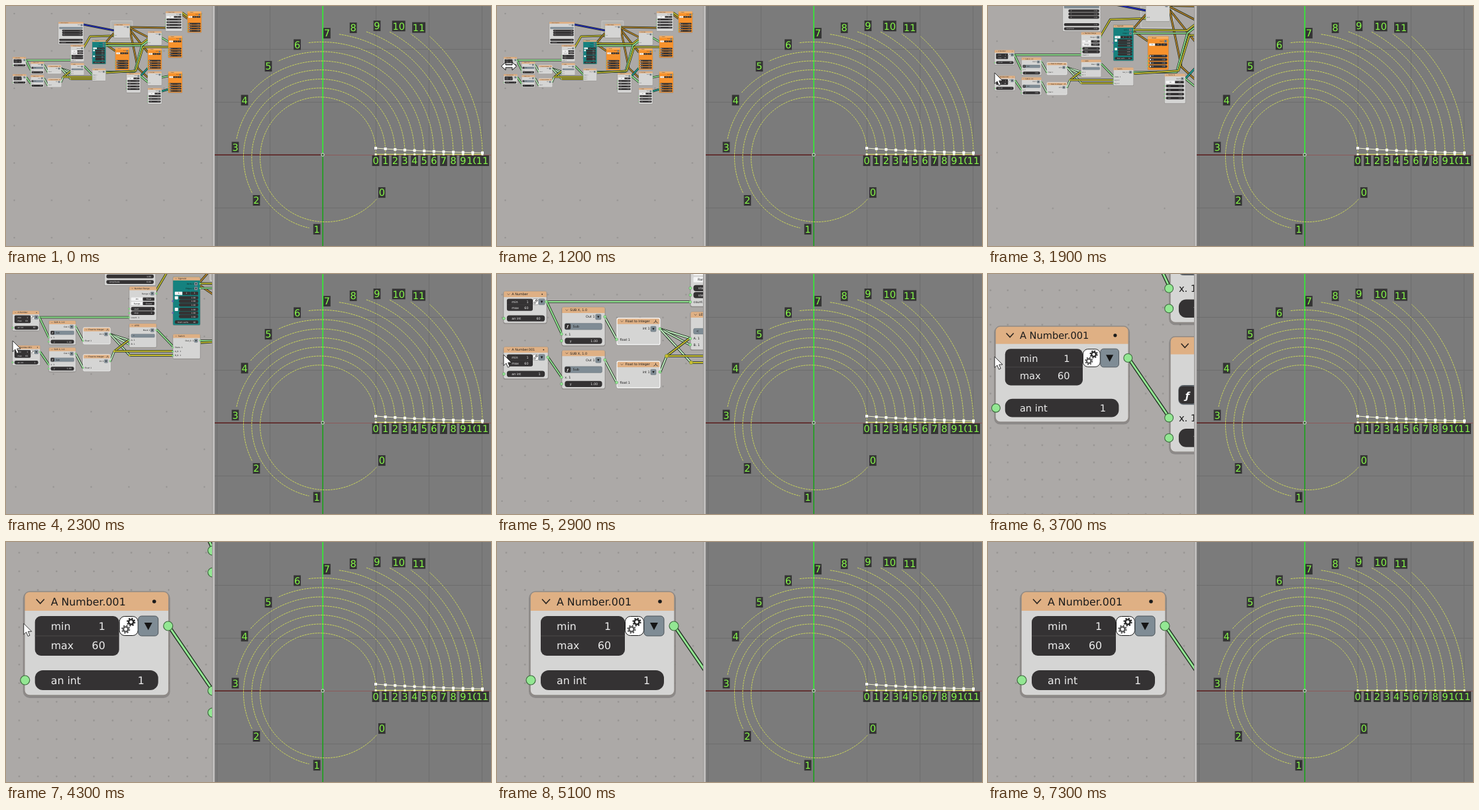
An HTML page that plays this animation: 732x363 px, repeating every 8 s.

```html
<!DOCTYPE html>
<html lang="en">
<head>
<meta charset="utf-8">
<title>Node graph and spiral curves</title>
<style>
html, body { margin: 0; width: 100%; height: 100%; overflow: hidden; background: #7b7b7b; }
svg { display: block; width: 732px; height: 363px; }
text { font-family: 'DejaVu Sans', sans-serif; font-size: 15.8px; text-rendering: geometricPrecision; }
.link { fill: none; vector-effect: non-scaling-stroke; stroke-linejoin: round; }
.edge { stroke: #1c2b1c; stroke-width: var(--edge); }
.core { stroke-width: var(--core); }
.curve { fill: none; stroke: #cbd65c; stroke-dasharray: 3 1; }
.tag { font-size: 14.5px; fill: #86f64a; text-anchor: middle; }
</style>
</head>
<body>
<svg id="stage" viewBox="0 0 732 363">
  <defs>
    <pattern id="dots" patternUnits="userSpaceOnUse"><circle r="1.1" fill="#8b8987"/></pattern>
    <clipPath id="pane"><rect width="311" height="363"/></clipPath>
  </defs>
  <rect width="312" height="363" fill="#aca9a7"/>
  <rect width="311" height="363" fill="url(#dots)"/>
  <g clip-path="url(#pane)"><g id="graph"></g></g>
  <rect x="311" width="4" height="363" fill="#bfbdbc"/>
  <rect x="311" width="1" height="363" fill="#9b9997"/>
  <g id="view"></g>
  <g id="arrow"><path d="M0 0V16.5L3.9 13L6.4 19.2L9.2 18L6.7 12H12Z" fill="#fff" stroke="#222" stroke-width=".9"/></g>
  <g id="sizer"><path d="M-11.5 0L-5 -6V-2H5V-6L11.5 0L5 6V2H-5V6Z" fill="#fff" stroke="#111"/></g>
</svg>
<script>
const $ = id => document.getElementById(id);
const graph = $('graph'), view = $('view');
const GREEN = '#93e793', DARK = '#343233', HEAD = '#dfb084', BODY = '#d5d5d4',
      STEEL = '#7f8c95', ORANGE = '#f7922c', YELLOW = '#c9bd2e', BROWN = '#b5802a', TEAL = '#15827f';

function add(parent, tag, attrs, str) {
  const e = document.createElementNS('http://www.w3.org/2000/svg', tag);
  for (const k in attrs) e.setAttribute(k, attrs[k]);
  if (str !== undefined) e.textContent = str;
  return parent.appendChild(e);
}
const box = (p, x, y, width, height, fill, rx = 0, more = {}) =>
  add(p, 'rect', { x, y, width, height, fill, rx, ...more });
const label = (p, x, y, str, fill = '#1b1b1b', anchor = 'start') =>
  add(p, 'text', { x, y, fill, 'text-anchor': anchor }, str);

// ---- right view: grid, axes, spirals ----
const CX = 478, CY = 225;
box(view, 315, 0, 417, 363, '#7b7b7b');
for (const x of [318, 398, 558, 638, 718]) box(view, x, 0, 1, 363, '#6d6d6d');
for (const y of [65, 145, 305]) box(view, 315, y, 417, 1, '#6d6d6d');
box(view, 315, 224.5, 163, 1.5, '#5a1c1c');
box(view, CX, 225, 254, 1, '#8c5a5a');
box(view, 477.3, 0, 1.7, 225, '#35ea35');
box(view, 477.3, 225, 1.7, 138, '#21a021');

const ends = [[106, 327.4], [113, 265.5], [121.5, 214.6], [132.5, 175], [144, 145], [157, 121.5],
              [171, 103], [184, 88], [197.5, 76.5], [211.5, 67.2], [226, 59.5], [241, 53]];
const startX = i => 558 + 14.64 * i;
const polar = (r, a) => [CX + r * Math.cos(a * Math.PI / 180), CY - r * Math.sin(a * Math.PI / 180)];

ends.forEach(([r1, turn], i) => {
  const r0 = startX(i) - CX, pts = [];
  for (let a = 0; a <= turn - 5; a += 1.5) pts.push(polar(r0 + (r1 - r0) * a / turn, a).map(v => v.toFixed(1)));
  add(view, 'polyline', { class: 'curve', points: pts.join(' ') });
});
add(view, 'circle', { cx: CX, cy: CY, r: 2.2, fill: '#2c5a2c', stroke: '#e8f4e8' });
box(view, 558, 223.8, 161, 1.2, '#d3e86a');
for (let i = 0; i < 12; i++) box(view, startX(i) - 1.5, 223, 3, 3, '#eef3d8');

const row = add(view, 'g', {});
const rowY = i => CY - 10 * Math.exp(-i / 9);
const rowPts = ends.map((_, i) => startX(i) + ',' + rowY(i));
add(row, 'polyline', { points: rowPts.join(' '), fill: 'none', stroke: '#eef0c8' });
ends.forEach((_, i) => box(row, startX(i) - 2, rowY(i) - 2, 4, 4, '#fff'));

function tag(x, y, n) {
  const w = 9.2 * String(n).length + 1.5;
  box(view, x - w / 2, y - 8, w, 16, '#343434');
  add(view, 'text', { class: 'tag', x, y: y + 5.3 }, n);
}
ends.forEach(([r, a], i) => tag(...polar(r, a), i));
ends.forEach((_, i) => tag(startX(i), 234, i));

// ---- node graph; one unit is one pixel at full zoom ----
const far = (x, y) => [(x - 10) * 10.48, (y - 103) * 10.48];
const near = (x, y) => [(x - 10) * 3.25, (y - 110) * 3.25];

function link(color, unit, ...xy) {
  const pts = [];
  for (let i = 0; i < xy.length; i += 2) pts.push(unit(xy[i], xy[i + 1]));
  add(graph, 'polyline', { class: 'link edge', points: pts.join(' ') });
  add(graph, 'polyline', { class: 'link core', points: pts.join(' '), stroke: color });
}
const socket = (p, cx, cy, fill = GREEN, r = 7) =>
  add(p, 'circle', { cx, cy, r, fill, stroke: '#3f6b3f', 'stroke-width': 1.2 });

function node(x, y, w, h, title, head = HEAD, body = BODY, selected = false) {
  const g = add(graph, 'g', { transform: `translate(${x} ${y})` });
  box(g, -2, 0, w + 4, h + 4, '#00000030', 10);
  box(g, 0, 0, w, h, body, 8);
  add(g, 'path', { d: `M0 29V8Q0 0 8 0H${w - 8}Q${w} 0 ${w} 8V29Z`, fill: head });
  box(g, 0, 0, w, h, 'none', 8, { stroke: selected ? '#fff' : '#8f8a86', 'stroke-width': selected ? 4 : 1.5 });
  add(g, 'path', { d: 'M18 11.5L24 18L30 11.5', fill: 'none', stroke: '#2a2420', 'stroke-width': 1.6 });
  label(g, 40, 20.5, title);
  return g;
}
function field(g, x, y, w, name, value, h = 30) {
  box(g, x, y, w, h, DARK, Math.min(12, h / 2));
  label(g, x + 24, y + h / 2 + 6, name, '#ececec');
  label(g, x + w - 21, y + h / 2 + 6, value, '#ececec', 'end');
}
function drop(g, x, y, s = 30) {
  box(g, x, y, s, s, STEEL, 5, { stroke: '#4b5359' });
  add(g, 'path', { d: `M${x + s * .3} ${y + s * .33}h${s * .4}l${-s * .2} ${s * .38}Z`, fill: '#151515' });
}
function gear(g, cx, cy, color) {
  add(g, 'circle', { cx, cy, r: 3.6, fill: 'none', stroke: color, 'stroke-width': 2.4 });
  add(g, 'circle', { cx, cy, r: 5.6, fill: 'none', stroke: color, 'stroke-width': 2, 'stroke-dasharray': '2.2 2.2' });
}
function output(g, w, y, name, fill) {
  label(g, w - 50, y + 5, name, '#1b1b1b', 'end');
  drop(g, w - 46, y - 13, 27);
  socket(g, w, y, fill);
}
function input(g, y, name) {
  socket(g, -2, y);
  label(g, 14, y + 5.5, name);
}
function segments(g, x, y, w, names) {
  const s = w / names.length;
  names.forEach((n, i) => {
    box(g, x + i * s, y, s - 2, 26, i ? DARK : '#f4f4f4', 5);
    label(g, x + (i + .5) * s, y + 18.5, n, i ? '#eee' : '#222', 'middle');
  });
}

function numberNode(y, w, title, value) {
  const g = node(0, y, w, 157, title);
  add(g, 'circle', { cx: w - 22, cy: 15, r: 2.8, fill: '#1b1b1b' });
  box(g, 16, 37, 127, 60, DARK, 9);
  box(g, 16, 66.5, 127, 1, '#4a4849');
  label(g, 40, 58, 'min', '#ececec');
  label(g, 122, 58, '1', '#ececec', 'end');
  label(g, 40, 87, 'max', '#ececec');
  label(g, 122, 87, '60', '#ececec', 'end');
  box(g, 143.5, 37.5, 28, 29, '#fff', 8, { stroke: '#111' });
  gear(g, 161, 46, '#222');
  gear(g, 153, 57, '#555');
  drop(g, 172, 37);
  field(g, 16, 119, 186, 'an int', value);
  socket(g, w - 1, 52);
  socket(g, 1, 134);
}
function subNode(y) {
  const g = node(286, y, 211, 189, 'SUB X, 1.0');
  output(g, 211, 48, 'Out 1');
  box(g, 14, 80, 183, 31, STEEL, 7, { stroke: '#4b5359' });
  box(g, 14, 81, 29, 29, DARK, 7);
  add(g, 'text', { x: 28, y: 102, fill: '#fff', 'text-anchor': 'middle', 'font-style': 'italic', 'font-weight': 700 }, 'ƒ');
  label(g, 54, 101, 'Sub');
  input(g, 133, 'x. 1');
  socket(g, -2, 166);
  field(g, 14, 151, 183, 'y', '1.00');
}
function intNode(y) {
  const g = node(556, y, 211, 130, 'Float to Integer', HEAD, BODY, true);
  add(g, 'path', { d: 'M190 8V16L180 23M190 16L200 23', fill: 'none', stroke: '#222', 'stroke-width': 2.5 });
  output(g, 211, 52, 'int 1');
  input(g, 104, 'float 1');
}
// distant nodes, placed by their place in the overview
function block(x, y, w, h, kind, title) {
  const W = w * 10.48, H = h * 10.48, orange = kind === 'o';
  const g = node(...far(x, y), W, H, title, orange ? '#f5b066' : HEAD, orange ? ORANGE : BODY);
  output(g, W, 52, 'Out 1', orange ? '#d8c33a' : GREEN);
  if (kind === 's') return input(g, H - 40, 'in 1');
  segments(g, 14, 76, W - 28, orange ? ['A', 'B', 'C'] : ['on', 'off']);
  const from = orange ? H * .55 : 116;
  for (let r = from; r < H - 30; r += orange ? 37 : 43) {
    field(g, 14, r, W - 28, 'val', '1.00', 28);
    if (orange) box(g, 20, r + 7, 14, 14, '#eee', 3);
    socket(g, -1, r + 14);
  }
}

// frame behind the upper centre node
box(graph, ...far(158, 22.5), 345, 335, '#c4c2c166', 10, { stroke: '#d8d6d5', 'stroke-width': 6 });

link('#2026c4', far, 117, 28, 163, 37);
link(YELLOW, far, 117, 63, 127, 46, 163, 45);
link(BROWN, far, 187, 32, 241, 33);
link(BROWN, far, 187, 33, 214, 47);
link(BROWN, far, 187, 36, 214, 70);
link(BROWN, far, 187, 36, 199, 94, 214, 108);
link(BROWN, far, 149, 57, 163, 41);
link(BROWN, far, 149, 57, 165, 68);
link(BROWN, far, 266, 13, 274, 19);
link(YELLOW, far, 149, 56.5, 205, 57, 214, 50);
link(GREEN, far, 149, 60, 205, 60, 214, 53);
link(GREEN, far, 151, 99.5, 194, 99.5, 205, 60);
link(YELLOW, far, 151, 101, 196, 98, 207, 62, 245, 62);
link(YELLOW, far, 266, 10, 274, 16);
link(GREEN, far, 235, 48, 245, 54);
link(GREEN, far, 235, 108, 245, 106);
link('#1fa39b', far, 235, 129, 245, 126);
link('#1fa39b', far, 203, 106, 214, 94);
link(GREEN, far, 203, 106, 214, 115);
link(GREEN, far, 118, 91, 130, 103.5);

link(GREEN, near, 75, 42, 291, 42);
link(GREEN, near, 75, 42, 98, 91);
link(GREEN, near, 77, 126, 97.5, 156);
link('#c3f0c3', near, 163, 66, 181, 99);
link('#c3f0c3', near, 163, 131, 181, 165);
link('#c3f0c3', near, 246, 83, 291, 97);
link('#c3f0c3', near, 246, 83, 291, 107);
link('#c3f0c3', near, 246, 83, 293, 134);
link('#c3f0c3', near, 246, 149, 256, 124);
link(YELLOW, near, 256, 124, 291, 97);
link(YELLOW, near, 256, 124, 398, 124);
link(YELLOW, near, 293, 134, 398, 134);
socket(graph, ...near(256, 124), YELLOW, 9);
socket(graph, ...near(293, 134), YELLOW, 9);

numberNode(-273, 211, 'A Number', '60');
numberNode(0, 218, 'A Number.001', '1');
subNode(-195);
subNode(17);
intNode(-140);
intNode(72);

const range = node(917, -463, 213, 265, 'Number Range');
output(range, 213, 55, 'Range 1');
segments(range, 14, 86, 185, ['Int', 'Float']);
segments(range, 14, 120, 185, ['Range', 'Count']);
field(range, 14, 160, 185, 'start', '1');
field(range, 14, 194, 185, 'step', '1');
socket(range, -1, 175);
socket(range, -1, 209);
input(range, 243, 'count. 1');

const less = node(917, -172, 213, 187, 'LESS');
output(less, 213, 53, 'Mask 1');
box(less, 14, 82, 185, 28, STEEL, 7, { stroke: '#4b5359' });
label(less, 28, 101, '<');
input(less, 132, 'A. 1');
input(less, 162, 'B. 1');

const pick = node(1260, -88, 213, 192, 'Switch');
output(pick, 213, 50, 'Out_0. 1');
input(pick, 104, 'State. 1');
input(pick, 136, 'A_0. 1');
input(pick, 168, 'B_0. 1');

const teal = node(1260, -540, 213, 380, 'Sigmoid', HEAD, TEAL);
output(teal, 213, 55, 'Verts 1');
output(teal, 213, 92, 'Edges 1');
segments(teal, 14, 118, 185, ['1', '2', '3']);
for (const y of [152, 244]) {
  box(teal, 14, y, 26, 26, '#f4f4f4', 4);
  for (let i = 0; i < 3; i++) field(teal, 46, y + i * 28, 153, '', '1.00', 26);
  socket(teal, -1, y + 40, '#6a5fd0');
}
field(teal, 14, 342, 185, 'Num verts', '10', 28);

const wave = node(723, -828, 400, 356, 'Noise Displace');
output(wave, 400, 52, 'Out 1', '#4650dd');
box(wave, 14, 82, 372, 30, STEEL, 7);
field(wave, 60, 124, 326, 'X', '1.00');
field(wave, 60, 158, 326, 'Y', '1.00');
field(wave, 60, 192, 326, 'Z', '1.00');
field(wave, 14, 270, 372, '', '1.00');
field(wave, 14, 314, 372, 'Amplitude', '0.00');

block(163, 27, 24, 21, 's', 'Matrix Apply');
block(241, 8, 25, 30, 'l', 'Viewer Draw');
block(274, 8, 21, 32, 'o', 'Viewer');
block(214, 38, 21, 21, 's', 'List Item');
block(245, 45, 21, 33, 'o', 'Viewer');
block(214, 64, 21, 32, 'o', 'Viewer');
block(165, 63, 21, 34, 'o', 'Viewer');
block(182, 101, 21, 30, 'l', 'Vector In');
block(214, 99, 21, 21, 's', 'List Item');
block(245, 99, 21, 32, 'o', 'Viewer');
block(214, 124, 21, 24, 'l', 'Index');

// ---- timeline ----
// view: [zoom, x, y] of the lower number node
const zooms = [[0, .0954, 10, 103]];
function leg(zoom, x, y, ...times) {
  const [, z0, x0, y0] = zooms[zooms.length - 1];
  times.forEach((t, i) => {
    const u = (i + 1) / times.length, z = z0 * (zoom / z0) ** u;
    const f = zoom === z0 ? u : (z - z0) / (zoom - z0);
    zooms.push([t, z, x0 + (x - x0) * f, y0 + (y - y0) * f]);
  });
}
leg(.1923, 9.75, 108, 1600, 1700, 1800, 1900, 2000, 2100, 2300);
leg(.3077, 10, 110, 2400, 2500, 2600, 2700, 2900);
leg(.923, 11, 79, 3000, 3100, 3400, 3700);
leg(1, 11, 75, 3800);
leg(1, 50, 75, 4100, 4200, 4300, 4400, 4500, 4600, 4700);

// pointer: [time, shape, x, y]
const moves = [[0, '']];
for (let i = 0; i < 7; i++) moves.push([500 + i * 100, 'arrow', 624 - 97 * i, 33 + 8.5 * i]);
moves.push([1200, 'sizer', 18, 91], [1300, ''], [1400, 'arrow', 12, 95], [1600, 'arrow', 10, 101],
           [2500, 'arrow', 10, 110], [2900, 'arrow', 10, 122], [3100, 'arrow', 10, 125]);
for (let i = 1; i < 8; i++) moves.push([4000 + i * 100, 'arrow', 10 + 39 * i / 7, 125 - 4 * i / 7]);
moves.push([4900, 'arrow', 60, 200], [5000, 'arrow', 41, 304], [5100, '']);

// dot grid: [least zoom, pitch, phase x, phase y]
const grids = [[.6, 28.2, -36, 195], [.25, 112.8, 217.8, 307.8], [.15, 296, 618, 817], [0, 592, 618, 817]];
const dots = $('dots'), dot = dots.firstChild;

const at = (list, t) => list.filter(s => s[0] <= t).pop();
const put = (e, o) => { for (const k in o) e.setAttribute(k, o[k]); };
const begin = performance.now();
let shown = null;

function draw() {
  const t = (performance.now() - begin) % 8000;
  const step = at(zooms, t), [, z, x, y] = step;
  if (step !== shown) {
    shown = step;
    put(graph, { transform: `translate(${x} ${y}) scale(${z})` });
    graph.style.setProperty('--edge', 2.8 + 2.8 * z + 'px');
    graph.style.setProperty('--core', 1.5 + 1.5 * z + 'px');
    const [, pitch, px, py] = grids.find(g => z >= g[0]);
    const gap = pitch * z;
    put(dots, { width: gap, height: gap, x: x + px * z - gap / 2, y: y + py * z - gap / 2 });
    put(dot, { cx: gap / 2, cy: gap / 2 });
  }
  const [, shape, mx, my] = at(moves, t);
  for (const id of ['arrow', 'sizer'])
    put($(id), shape === id ? { visibility: 'visible', transform: `translate(${mx} ${my})` } : { visibility: 'hidden' });
  row.setAttribute('visibility', t < 7300 ? 'visible' : 'hidden');
  requestAnimationFrame(draw);
}
draw();
</script>
</body>
</html>
```
